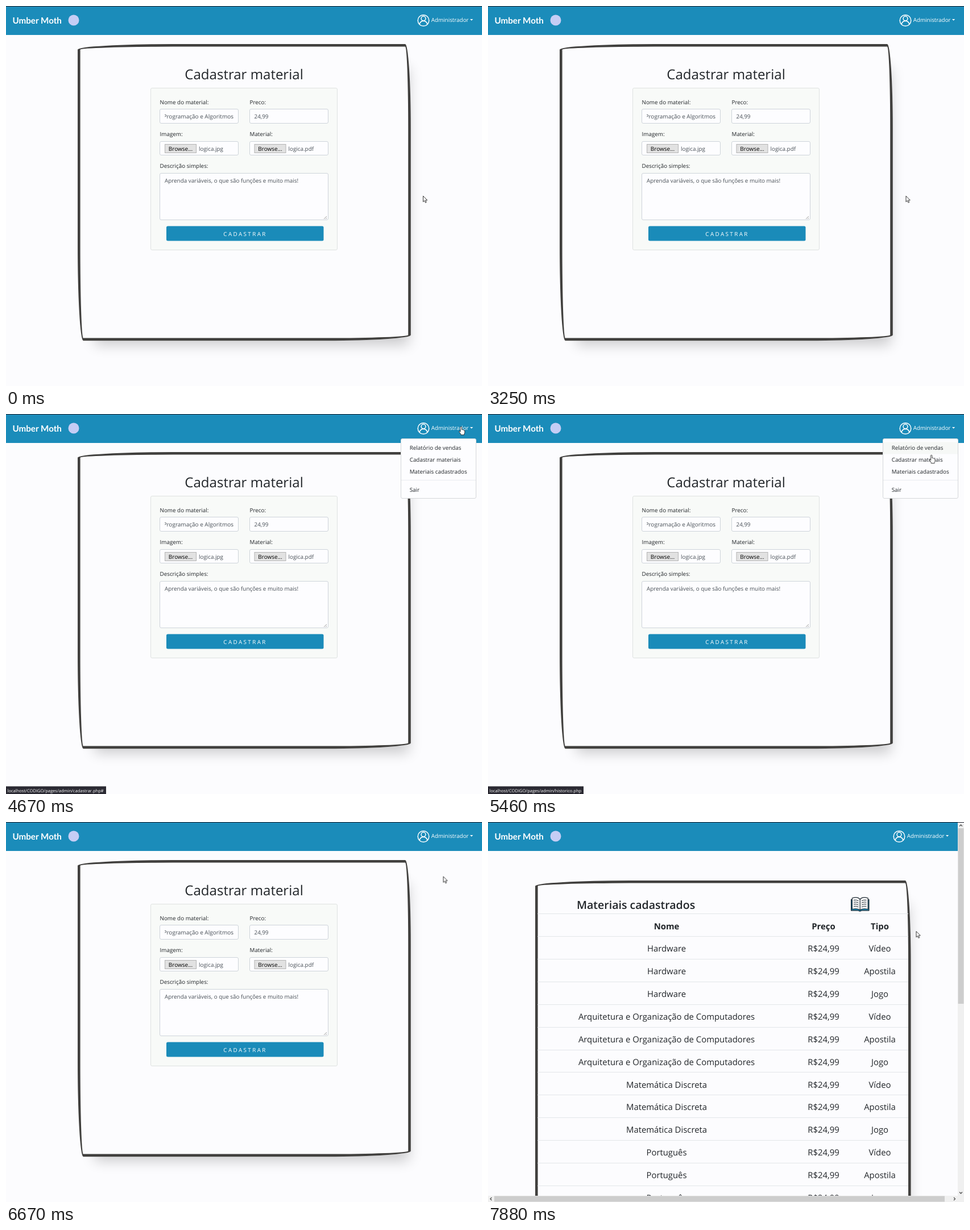
An HTML page that plays this animation: 837x669 px, repeating every 8 s.

```html
<!DOCTYPE html>
<html lang="pt">
<head>
<meta charset="utf-8">
<title>Cadastrar material</title>
<style>
  html, body { margin: 0; width: 100%; height: 100%; overflow: hidden; background: #fcfcfe; }
  body { position: relative; }
  svg, .page { position: absolute; left: 0; top: 0; width: 837px; height: 669px; overflow: hidden; }
  text {
    font: 9.85px "Open Sans", "Noto Sans", sans-serif;
    fill: #212529;
    text-rendering: geometricPrecision;
    white-space: pre;
  }

  /* Drawn at full page size, then zoomed out so the stroke keeps its fraction */
  .sketch {
    position: absolute;
    box-sizing: border-box;
    border: 7px solid #41403e;
    border-radius: 255px 15px 225px 15px / 15px 225px 15px 255px;
    box-shadow: 20px 38px 34px -26px rgba(0, 0, 0, .2);
    transform: scale(.656);
    transform-origin: 0 0;
  }
  #form .sketch { left: 125.8px; top: 66.8px; width: 893px; height: 796px; }
  #list .sketch { left: 82.5px; top: 103px; width: 1007px; height: 1616px; }

  .title { font-size: 24.05px; }
  .field rect { fill: #fdfdff; stroke: #ced4da; }
  .field text { fill: #495057; }
  .field .browse rect { fill: #e2e2e2; stroke: #b4b4b4; }
  .field .browse text { fill: #000; font-size: 10px; }
  .field .name { font-size: 10px; }
  .button { fill: #fff; letter-spacing: 2.4px; }
  .heading { font-size: 19.55px; font-weight: 600; }
  #rows text { font-size: 14.88px; text-anchor: middle; }
  #rows .head { font-weight: 700; }
  #rows path { stroke: #e3e6e9; }
  .brand { font: 700 15.2px Lato, "Open Sans", sans-serif; fill: #fff; }
  #user text, .status text { fill: #fff; }
  .status text { font-size: 7.55px; }
  .status rect { fill: #2b2a33; }

  /* Hard cuts on one shared 8 s clock */
  .cut { animation: 8s step-end infinite; }
  #form { animation-name: form; }
  #list, #bars { animation-name: list; }
  #user { animation-name: user; }
  #menu { animation-name: menu; }
  #hover { animation-name: hover; }
  #self { animation-name: self; }
  #sales { animation-name: sales; }
  #add { animation-name: add; }
  #all { animation-name: all; }
  #arrow { animation-name: arrow; }
  #hand { animation-name: hand; }
  #cursor { animation-name: move; }

  @keyframes form { 0% { opacity: 1 } 86.5% { opacity: 0 } }
  @keyframes list { 0% { opacity: 0 } 86.5% { opacity: 1 } }
  @keyframes user { 0% { transform: none } 86.5% { transform: translate(-11px, 0) } }
  @keyframes menu { 0%, 81.25% { opacity: 0 } 55.25% { opacity: 1 } }
  @keyframes self { 0%, 65.125% { opacity: 0 } 55.25% { opacity: 1 } }
  @keyframes sales { 0%, 69.875% { opacity: 0 } 65.125% { opacity: 1 } }
  @keyframes add { 0%, 75.5% { opacity: 0 } 69.875% { opacity: 1 } }
  @keyframes all { 0%, 83.375% { opacity: 0 } 75.5% { opacity: 1 } }
  @keyframes arrow { 0%, 81.25% { opacity: 1 } 49.5% { opacity: 0 } }
  @keyframes hand { 0%, 81.25% { opacity: 0 } 49.5% { opacity: 1 } }
  @keyframes hover {
    0% { opacity: 0; transform: none }
    65.125% { opacity: 1; transform: none }
    69.875% { opacity: 1; transform: translate(0, 21px) }
    75.5% { opacity: 1; transform: translate(0, 42px) }
  }
  @keyframes move {
    0% { transform: translate(733px, 334px) }
    40.625% { transform: translate(734.5px, 334px) }
    41.75% { transform: translate(738px, 322px) }
    43% { transform: translate(745px, 285px) }
    44.25% { transform: translate(756px, 225px) }
    45.625% { transform: translate(771px, 150px) }
    46.875% { transform: translate(784px, 90px) }
    48.125% { transform: translate(792px, 50px) }
    49.5% { transform: translate(797px, 32px) }
    51.125% { transform: translate(799px, 28px) }
    52.125% { transform: translate(800px, 27px) }
    57.375% { transform: translate(800px, 22px) }
    58.625% { transform: translate(800px, 18px) }
    59.875% { transform: translate(799px, 17px) }
    61% { transform: translate(797px, 23px) }
    63.625% { transform: translate(794px, 38px) }
    65.125% { transform: translate(789px, 55px) }
    66.75% { transform: translate(784px, 66px) }
    68.25% { transform: translate(779.5px, 72px) }
    69.875% { transform: translate(778px, 76px) }
    71.875% { transform: translate(775px, 82px) }
    73% { transform: translate(773px, 88px) }
    74.25% { transform: translate(772px, 93px) }
    75.5% { transform: translate(770px, 99px) }
    78.125% { transform: translate(769px, 96px) }
    81.25% { transform: translate(768.5px, 95.5px) }
    97.375% { transform: translate(761px, 148px) }
    98.5% { transform: translate(752.5px, 192px) }
  }
</style>
</head>
<body>

<div id="form" class="page cut">
  <div class="sketch"></div>
  <svg viewBox="0 0 837 669">
    <clipPath id="input"><path d="M279 182H401V206H279Z"/></clipPath>
    <text class="title" x="418.5" y="128.5" text-anchor="middle">Cadastrar material</text>
    <rect x="254.5" y="144.5" width="328" height="285" rx="2.5" fill="#f8faf8" stroke="#dfe2e1"/>

    <text x="270.5" y="172.5">Nome do material:</text>
    <text x="428.5" y="172.5">Preco:</text>
    <text x="270.5" y="228.5">Imagem:</text>
    <text x="428.5" y="228.5">Material:</text>
    <text x="270.5" y="284.8">Descrição simples:</text>

    <g class="field">
      <rect x="270.5" y="181.5" width="138" height="25" rx="2.5"/>
      <text class="name" x="400" y="198" text-anchor="end" clip-path="url(#input)">Programação e Algoritmos</text>
      <rect x="428.5" y="181.5" width="138" height="25" rx="2.5"/>
      <text x="436.5" y="198">24,99</text>
      <rect x="270.5" y="238.5" width="138" height="24" rx="2.5"/>
      <text x="339" y="254.5">logica.jpg</text>
      <rect x="428.5" y="238.5" width="138" height="24" rx="2.5"/>
      <text x="496.5" y="254.5">logica.pdf</text>
      <g id="browse" class="browse">
        <rect x="279.5" y="243.5" width="55" height="15"/>
        <text x="285.8" y="254.5">Browse...</text>
      </g>
      <use href="#browse" x="157.5"/>
      <rect x="270.5" y="294.5" width="296" height="82" rx="2.5"/>
      <text x="279" y="310.5">Aprenda variáveis, o que são funções e muito mais!</text>
      <path d="M559 375L564 370M562 375L564 373" stroke="#888" stroke-width=".8"/>
    </g>

    <rect x="282" y="387.5" width="276.5" height="26" rx="2.5" fill="#1a8bb9"/>
    <text class="button" x="382.3" y="405.2">CADASTRAR</text>
  </svg>
</div>

<div id="list" class="page cut">
  <div class="sketch"></div>
  <svg viewBox="0 0 837 669">
    <text class="heading" x="156" y="153">Materiais cadastrados</text>
    <g stroke="#16222b" stroke-width="1.2" stroke-linejoin="round">
      <path d="M638.6 136.5V155.8H650.5L654 157.2 657.5 155.8H669.9V136.5Z" fill="#1a8bb9"/>
      <path d="M640.3 134Q650 131 654.2 136Q658.500 131 668.200 134V153.500Q658.500 151.500 654.200 155Q650 151.500 640.300 153.500Z" fill="#fff"/>
      <path d="M654.2 136V155" fill="none"/>
      <g id="lines" fill="none" stroke-width="1">
        <path id="line" d="M643 137.5Q648 136.5 651.5 139"/>
        <use href="#line" y="3.6"/>
        <use href="#line" y="7.2"/>
        <use href="#line" y="10.8"/>
      </g>
      <use href="#lines" transform="matrix(-1 0 0 1 1308.4 0)"/>
    </g>
    <g id="rows"></g>
  </svg>
</div>

<svg viewBox="0 0 837 669">
  <rect width="837" height="51" fill="#1b8cba"/>
  <rect width="837" height="1" fill="#20232e"/>
  <text class="brand" x="11.5" y="31">Umber Moth</text>
  <circle cx="119" cy="25" r="9.5" fill="#c5cdf5"/>
  <g id="user" class="cut">
    <g fill="none" stroke="#fff" stroke-width="1.5">
      <circle cx="734" cy="25.5" r="9.8"/>
      <circle cx="734" cy="22" r="3.9"/>
      <path d="M727 32Q728.5 27.5 732 26.5H736Q739.5 27.5 741 32"/>
    </g>
    <text x="747.7" y="28">Administrador</text>
    <path d="M816 23H821.2L818.6 25.8Z" fill="#fff"/>
  </g>

  <g id="menu" class="cut">
    <rect x="694.5" y="43.5" width="132" height="105" rx="2.5" fill="#fdfdff" stroke="#d5d7d9"/>
    <rect id="hover" class="cut" x="695" y="49.5" width="131" height="21" fill="#f6f8f6"/>
    <text x="709.7" y="63.3">Relatório de vendas</text>
    <text x="709.7" y="84.3">Cadastrar materiais</text>
    <text x="709.7" y="105.2">Materiais cadastrados</text>
    <path d="M695 116.5H826" stroke="#e9ecef"/>
    <text x="709.7" y="137">Sair</text>
  </g>

  <g id="self" class="status cut">
    <rect y="655.5" width="176" height="14"/>
    <text x="2.5" y="665.5">localhost/CODIGO/pages/admin/cadastrar.php#</text>
  </g>
  <g id="sales" class="status cut">
    <rect y="655.5" width="168" height="14"/>
    <text x="2.5" y="665.5">localhost/CODIGO/pages/admin/historico.php</text>
  </g>
  <g id="add" class="status cut">
    <rect y="655.5" width="171" height="14"/>
    <text x="2.5" y="665.5">localhost/CODIGO/pages/admin/cadastrar.php</text>
  </g>
  <g id="all" class="status cut">
    <rect y="655.5" width="173" height="14"/>
    <text x="2.5" y="665.5">localhost/CODIGO/pages/admin/materiais.php</text>
  </g>

  <g id="bars" class="cut">
    <path d="M826 1H837V669H0V658H826Z" fill="#f0f0f0"/>
    <path d="M826.5 11H836.5V320H826.5ZM11 658.5H803V668.5H11Z" fill="#cdcdcd"/>
    <path d="M829 7.5L831.5 5 834 7.5M829 651.5L831.5 654 834 651.5M6.5 661L4 663.5 6.5 666M819 661L821.5 663.5 819 666" fill="none" stroke="#505050" stroke-width="1.3"/>
  </g>

  <g id="cursor" class="cut">
    <path id="arrow" class="cut" d="M.5.5V10.8L2.9 8.6 4.5 12.3 6.2 11.5 4.6 7.9H7.8Z" fill="#fff" stroke="#222" stroke-width=".9"/>
    <path id="hand" class="cut" d="M-1 1.5a1.2 1.2 0 0 1 2.4 0V5.5Q2.6 4.8 3.3 6 4.6 5.4 5.1 6.6 6.7 6.3 6.7 8V10.5Q6.6 12 5.6 13.2V14.8H-.2V13.4L-3.3 9.3Q-3.4 7.9 -2.2 8.2L-1 9.4Z" fill="#fff" stroke="#222" stroke-width=".9" stroke-linejoin="round"/>
  </g>
</svg>

<script>
  const subjects = ["Hardware", "Arquitetura e Organização de Computadores", "Matemática Discreta", "Português"];
  const kinds = ["Vídeo", "Apostila", "Jogo"];
  const columns = [314, 590, 689];
  const pitch = 39.86;

  const rowMarkup = (cells, i, style = "") =>
    `<path d="M87 ${Math.floor(161.9 + i * pitch) + .5}H739"/>` +
    cells.map((cell, c) =>
      `<text class="${style}" x="${columns[c]}" y="${188.5 + i * pitch}">${cell}</text>`).join("");

  const items = subjects.flatMap(name => kinds.map(kind => [name, "R$24,99", kind]));
  document.getElementById("rows").innerHTML =
    rowMarkup(["Nome", "Preço", "Tipo"], 0, "head") +
    items.map((cells, i) => rowMarkup(cells, i + 1)).join("");
</script>
</body>
</html>
```
